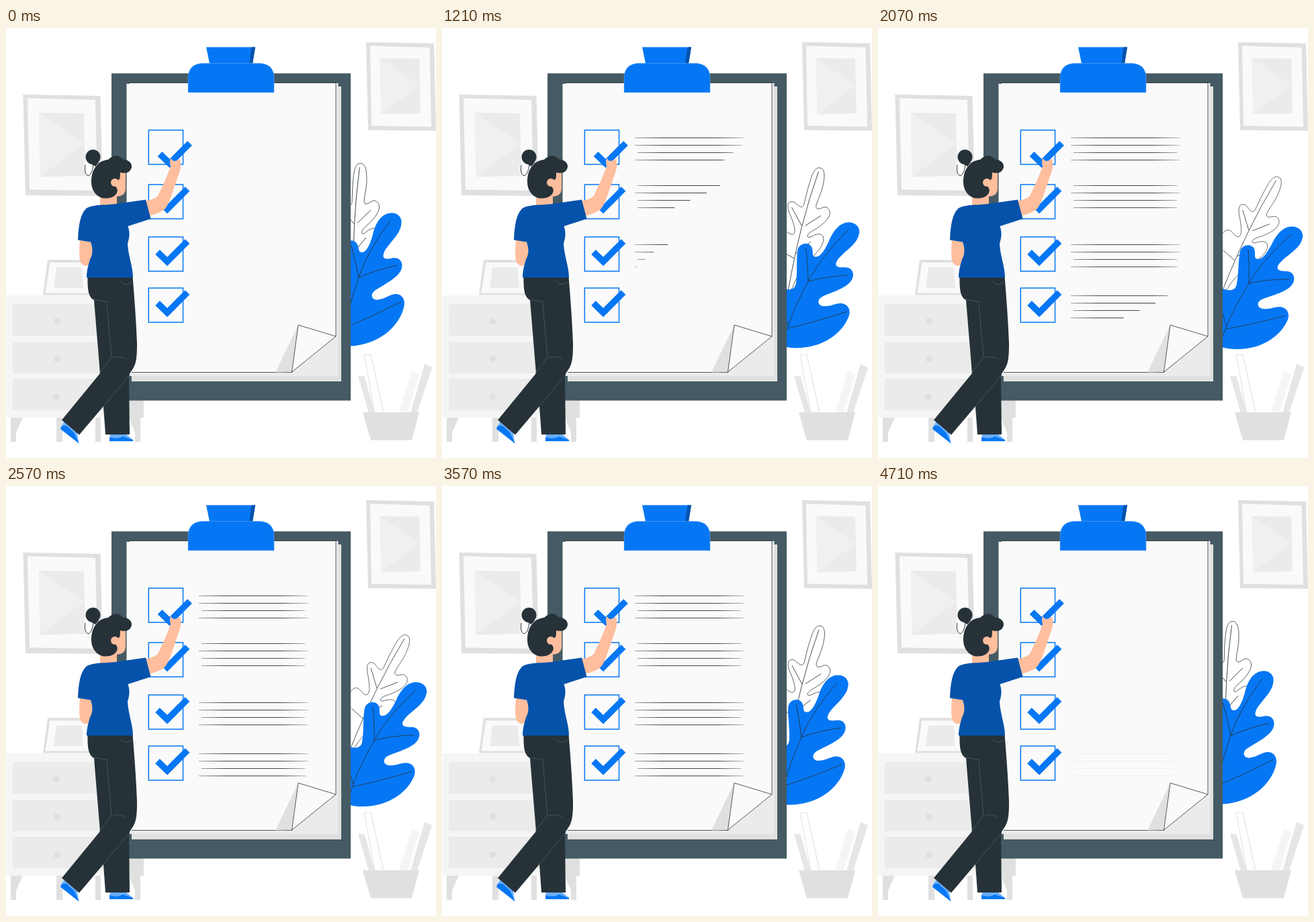
An HTML page that plays this animation: 640x640 px, repeating every 4780 ms.

```html
<!DOCTYPE html>
<html lang="en">
<head>
<meta charset="utf-8">
<title>Checklist</title>
<style>
  html, body { margin: 0; height: 100%; overflow: hidden; background: #fff; }
  svg { display: block; width: 100vw; height: 100vh; }
  .g1 { fill: #fafafa; } .g2 { fill: #f5f5f5; } .g3 { fill: #ebebeb; } .g4 { fill: #e0e0e0; }
  .blue { fill: #0677f4; } .navy { fill: #0552ab; } .dark { fill: #263238; }
  .skin { fill: #ffbe9d; } .sky { fill: #69aef9; }
  .ink { fill: none; stroke: #263238; stroke-width: .8; }
  .seam { fill: none; stroke: #455a64; stroke-width: .9; }
  .box { fill: none; stroke: #0677f4; stroke-width: 1.5; }
  .tick { fill: none; stroke: #0677f4; stroke-width: 9.5; }
</style>
</head>
<body>
<svg viewBox="0 0 640 640">
  <defs>
    <linearGradient id="taper" gradientUnits="userSpaceOnUse" x1="287" x2="449" y1="0" y2="0">
      <stop offset="0" stop-color="#263238" stop-opacity=".4"/>
      <stop offset=".25" stop-color="#263238" stop-opacity=".9"/>
      <stop offset=".75" stop-color="#263238" stop-opacity=".9"/>
      <stop offset="1" stop-color="#263238" stop-opacity=".3"/>
    </linearGradient>
    <path id="tick" class="tick" d="M225.5 409.500L240 423.500L270 393.500"/>
  </defs>

  <!-- wall frames -->
  <path class="g4" d="M25.500 99L140.500 101L144 250L29 249Z"/>
  <path class="g1" d="M32 104.500L133 107L136 242L35 240.500Z"/>
  <path class="g3" d="M49 126L116 127L118 220L50.500 221.500Z"/>
  <path fill="#f0f0f0" d="M49 126L116.500 172L50.500 221.500Z"/>
  <path class="g4" d="M536 21L637 23L640 153L539 152Z"/>
  <path class="g1" d="M542 26.500L630.500 29L633 147L544 145.500Z"/>
  <path class="g3" d="M556.500 45L615 45.500L617 127L558.500 128.500Z"/>
  <path fill="#f0f0f0" d="M556.500 45L616 85.500L558.500 128.500Z"/>

  <!-- dresser -->
  <path class="g4" d="M62 345H130V397.500H55Z"/>
  <path class="g1" d="M65.500 349H130V394.500H58.500Z"/>
  <path class="g3" d="M75 356.500H113L115 387H71Z"/>
  <path class="g4" d="M7 580H25L15 602V616H7ZM75 580H84V616H75ZM133 580H141V616H133ZM183 580H200V616H192V602ZM141 540H205V580H141Z"/>
  <path class="g2" d="M1 398H150V580H1Z"/>
  <path class="g3" d="M10 411H150V458H10ZM10 467H150V514H10ZM10 522H150V569H10Z"/>
  <g class="g4"><circle cx="75.500" cy="436.500" r="5"/><circle cx="75.500" cy="492.500" r="5"/><circle cx="75.500" cy="549" r="5"/></g>

  <!-- pencil pot -->
  <path fill="#e6e6e6" d="M524 518H533.500L549 573H540ZM623 500L634 505L612 573H602Z"/>
  <path fill="#fff" stroke="#e0e0e0" d="M533 486H543L562 573H549Z"/>
  <path class="g2" d="M604 510L615 515L598 573H585Z"/>
  <path class="g4" d="M531 572H615L604 613.500H543Z"/>

  <!-- plants -->
  <g id="pale">
    <path class="ink" style="fill:#fff;stroke-width:.7" d="M596 222C590 219 583 228 577 240C570 252 566 262 562 270C558 277 554 272 549 265C545 261 539 262 538 267C536 274 539 282 540 290C541 300 542 306 538 310C534 313 530 306 525 302C521 299 516 301 513 306C508 315 512 330 512 345C512 370 502 380 508 398L520 388C530 370 545 360 565 345C580 335 585 320 574 318C566 317 558 323 557 318C558 314 565 312 574 309C583 305 594 300 597 291C598 284 594 279 587 281C582 282 577 282 579 276C583 268 593 256 597 244C601 235 603 224 596 222Z"/>
    <path class="ink" d="M593 227Q570 265 551 304Q532 343 513 390M557 302L583 292M552 301L543 271M534 340L560 327M531 346L514 331"/>
  </g>
  <g id="leaf">
    <path class="blue" d="M490 480L500 386H509C525 394 533 390 534 380C537 365 536 345 539 332C542 322 556 320 560 329C563 336 558 344 566 344C573 344 580 333 586 322C592 309 602 296 615 295.500C629 295 635 306 631 315C627 330 605 340 597 351C590 361 600 362 607 362C617 362 622 370 618 379C612 393 585 398 571 404C563 408 564 417 573 418C583 419 590 415 598 415C611 416 614 428 608 438C600 455 575 478 535 478C525 478 518 477 512 475Z"/>
    <path class="ink" d="M616 307C595 325 570 350 552 380C540 400 525 425 512 462M552 380Q578 374 612 374M552 380Q553 352 551 330M518 448Q558 441 607 428M519 445L511 418"/>
  </g>

  <!-- clipboard -->
  <path fill="#455a64" d="M157 67.500H513V554.500H157Z"/>
  <path class="g4" d="M187 87H499V526H187Z"/>
  <path class="g3" d="M184 82H494.500V518H184Z"/>
  <path class="g1" d="M179.500 83H491V459L425 512.500H179.500Z"/>
  <path class="ink" d="M184 81.500H491V459M187 512.500H426"/>
  <path class="g4" d="M435 442L425.500 512L401 512.500Z"/>
  <path class="ink" style="fill:#fafafa" d="M435 442L491 459L425.500 512Z"/>
  <path class="blue" d="M298 28.500H371L367 53H303Z"/>
  <path class="navy" d="M365.500 28.500H371L367 53H362Z"/>
  <path class="blue" stroke="#69aef9" stroke-width=".5" d="M271 96V75Q271 52.500 294 52.500H376Q399 52.500 399 75V96Z"/>

  <!-- list -->
  <path class="box" d="M212.300 152H263.500V203H212.300ZM212.300 233H263.500V284H212.300ZM212.300 311H263.500V362H212.300ZM212.300 387H263.500V438H212.300Z"/>
  <use href="#tick"/><use href="#tick" y="-76"/><use href="#tick" y="-154"/><use href="#tick" x="3.500" y="-222"/>
  <g id="rows" stroke="url(#taper)"></g>

  <!-- woman -->
  <path class="ink" style="fill:#fff;stroke-width:1" d="M118 204C115 222 127 228 130 203"/>
  <circle class="dark" cx="129.500" cy="192" r="11"/><path class="dark" d="M123 200H138L133 206Z"/>
  <path class="skin" d="M140 246H165V264H140ZM155 212L178 214V238C178 249 171 251 160 251Z"/>
  <path class="dark" d="M127 229C127 209 138 197 152 196C159 189 168 188 174 195.500C181 195 188 201 187 207C185 216 177 217 170 215C170 221 170 226 167 226L163 236C167 239 167 246 161 250C155 254 149 254 143 253C133 250 127 240 127 229Z"/>
  <circle class="skin" cx="162" cy="230" r="6"/>
  <path class="skin" d="M110 315C109 330 108 345 112 350C115 355 121 355 123 352C124 345 129 340 129 331L126 317Z"/>
  <path class="skin" d="M206 258C215 256 222 254 226 250C233 235 241 218 245 206C243.500 201 243.500 195 246 194C248 200 253 198 259 195C261 202 260 210 258 215C251 235 245 255 240 264C235 274 225 276 213 280Z"/>
  <path class="sky" d="M86 586L106 602L108 618L81 597Z"/><path class="blue" d="M90 592L101 602L109 618.500L81 596.500L83 592Z"/>
  <path class="sky" d="M155 603H177L190 614H154Z"/><path class="blue" d="M154 609Q166 613 174 608L189 613V615H154Z"/>
  <path class="dark" d="M121.500 370H188.500C191 400 194 440 195 470C195 490 194 501 187 510L183 516L184 605H148L145 563L109 605.500L83 583.500L140 514L131 405C124 401 121 393 121.500 370Z"/>
  <path class="seam" d="M131 404L152 408M150 409L157 490L139 514M159 491Q170 487 179 493M169 376Q176 386 187 378M145 563L184 516"/>
  <path class="navy" d="M107 315.500C108 295 110 278 119 269C128 262 150 264 166 261.500L208 255.500L215.500 284L181.500 295C186 308 182 316 181 321C182 340 189 355 189 371.500H120C120 360 124 346 127 340C130 332 128 325 126 318.500Z"/>
</svg>
<script>
const LOOP = 4780, STEP = LOOP / 67;
const ease = p => (1 - Math.cos(Math.PI * Math.min(1, Math.max(0, p)))) / 2;
const sway = (t, peak) => t < peak ? ease(t / peak) : ease((LOOP - t) / (LOOP - peak));
const get = id => document.getElementById(id);

const rows = [];
[[163.5, 0], [234.5, 355], [322.5, 725], [398.5, 1190]].forEach(([top, delay], group) => {
  for (let i = 0; i < 4; i++) {
    const el = document.createElementNS('http://www.w3.org/2000/svg', 'line');
    const inset = i === 2 || (group === 1 && i !== 1) ? 4 : 0;
    const y = top + i * 11;
    el.setAttribute('x1', 287 + inset);
    el.setAttribute('y1', y);
    el.setAttribute('y2', y);
    get('rows').append(el);
    rows.push({ el, x: 287 + inset, width: 162 - 2 * inset, start: delay + i * 110, floor: group === 3 ? .07 : 0 });
  }
});

function draw(now) {
  const t = Math.floor(now % LOOP / STEP) * STEP;
  get('pale').setAttribute('transform', `rotate(${24 * sway(t, 2330) - 23.4} 512 378)`);
  get('leaf').setAttribute('transform', `rotate(${12.5 * sway(t, 1770) - 12.2} 500 503)`);
  const fade = 1 - ease((t - 4030) / 500);
  for (const { el, x, width, start, floor } of rows) {
    const grown = ease((t - start) / 1120);
    el.setAttribute('x2', x + width * grown);
    el.setAttribute('opacity', grown ? Math.max(floor, fade) : 0);
  }
  requestAnimationFrame(loop);
}
const begin = performance.now();
const loop = () => draw(performance.now() - begin);
draw(0);
</script>
</body>
</html>
```
